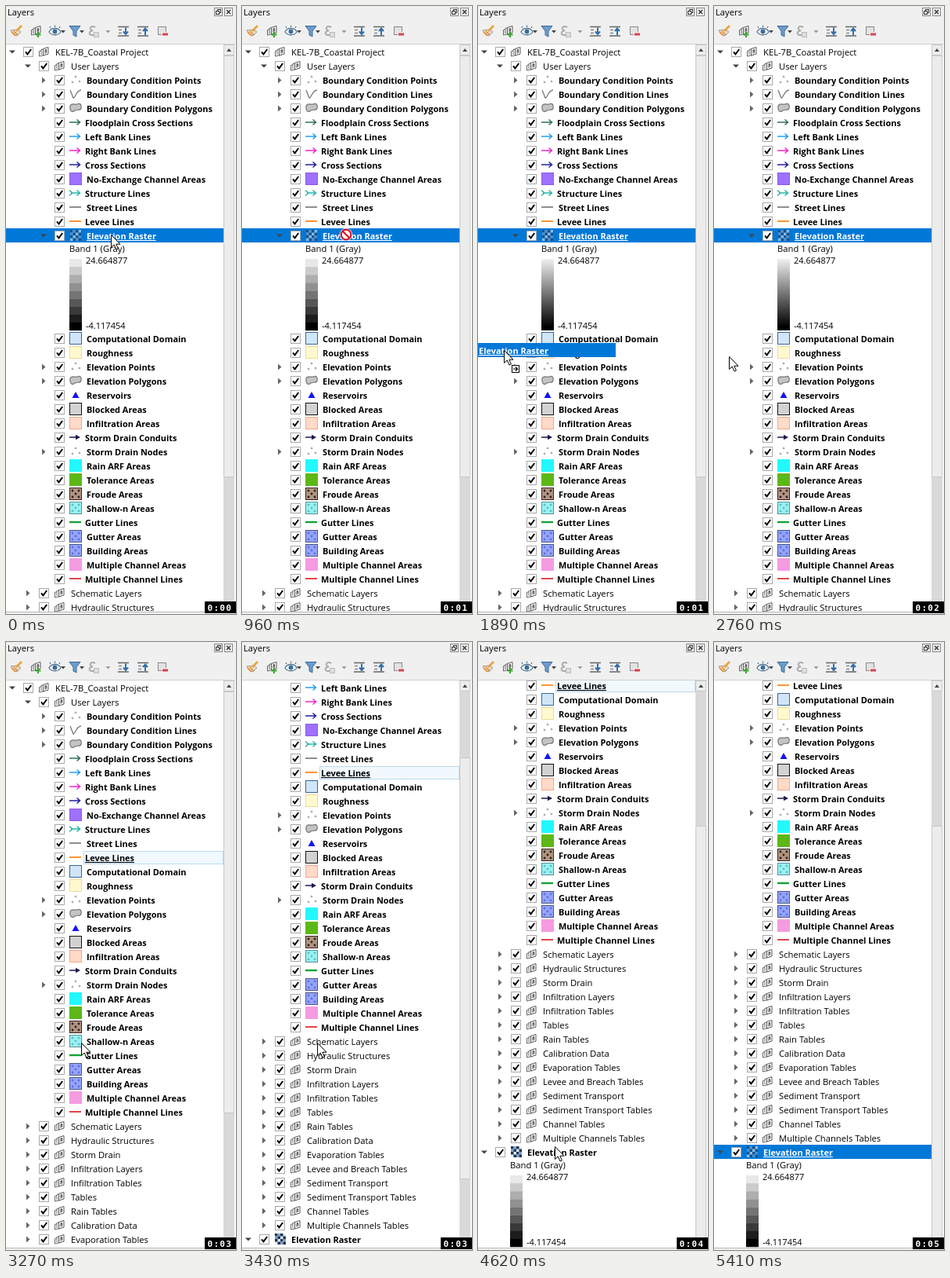
An HTML page that plays this animation: 294 px wide and 774 px high, repeating every 5950 ms.

```html
<!DOCTYPE html>
<html lang="en">
<head>
<meta charset="utf-8">
<title>Layers panel</title>
<style>
html, body { margin: 0; width: 100%; height: 100%; overflow: hidden; background: #f0f0f0; }
svg { display: block; width: 100%; height: 100%; }
text { font: 450 11.25px "Open Sans", "Noto Sans", sans-serif; fill: #000; white-space: pre; }
.b { font-weight: 700; font-size: 10.95px; }
.u { text-decoration: underline; }
.w { fill: #fff; }
.num { font-size: 11px; }
.clock { font: 700 11px "DejaVu Sans Mono", monospace; letter-spacing: 1.3px; fill: #fff; }
</style>
</head>
<body>
<svg id="stage" viewBox="0 0 294 774" xmlns="http://www.w3.org/2000/svg"></svg>
<script>
const LOOP = 5950, ROW = 18, TOP = 49, BLUE = '#0078d7';

// ---- drawing helpers ----
const rect = (x, y, w, h, fill, more = '') =>
  `<rect x="${x}" y="${y}" width="${w}" height="${h}" fill="${fill}" ${more}/>`;
const box = (x, y, w, h, fill, edge) =>
  rect(x + .5, y + .5, w - 1, h - 1, fill, `stroke="${edge}"`);
const path = (d, stroke, width = 1, fill = 'none') =>
  `<path d="${d}" stroke="${stroke}" stroke-width="${width}" fill="${fill}"/>`;
const dot = (x, y, r, fill, more = '') =>
  `<circle cx="${x}" cy="${y}" r="${r}" fill="${fill}" ${more}/>`;
const text = (x, y, s, cls = '', id = '') =>
  `<text x="${x}" y="${y}" class="${cls}" ${id && `id="${id}"`}>${s}</text>`;
const group = (x, y, body, id = '') =>
  `<g transform="translate(${x} ${y})" ${id && `id="${id}"`}>${body}</g>`;

// ---- layer symbols, 16 x 16 ----
const fill = (c, edge = c) => ({ tx: 103, art: box(0, 0, 16, 16, c, edge) });
const line = (c, w = 2, tx = 101) => ({ tx, art: path('M0 8H15', c, w) });
const arrow = c => ({ tx: 101, art: path('M0 8H13.5M9.5 4.5L13.5 8L9.5 11.5', c, 1.5) });
const dotted = (c, spot, edge) => {
  let art = box(0, 0, 16, 16, c, edge);
  for (const [x, y] of [[4, 4], [12, 4], [8, 8], [4, 12], [12, 12]]) art += dot(x, y, 1.4, spot);
  return { tx: 103, art };
};
const points = { tx: 103, art: [[4, 11], [8, 4], [13, 10]]
  .map(([x, y]) => dot(x, y, 1.1, '#bbb', 'stroke="#888" stroke-width=".5"')).join('') };
const vee = { tx: 103, art: path('M1 3L5 13C8 13 8 4 15 3', '#777', 1.3) };
const blob = { tx: 103, art: path('M1 5C3 1 7 4 10 3C14 1 16 4 15 8C14 12 10 9 7 11C4 14 0 12 1 5Z', '#777', 1.2, '#c4c4c4') };
const fork = { tx: 101, art: path('M2 8H13.5M9.5 4.5L13.5 8L9.5 11.5M0 4.5L4 8L0 11.5', '#2bb5a8', 1.5) };
const tri = { tx: 103, art: path('M8 4L12.5 12H3.5Z', 'none', 0, '#1414f5') };
const conduit = { tx: 101, art: path('M0 8H12', '#1b1b4b', 1.5) + path('M8 4.8L14 8L8 11.2Z', 'none', 0, '#1b1b4b') };
const folder = path('M1.5 6.5V13L8 11.5M4 4.5V11', '#666') +
  path('M6.5 3.5L13 1.5V10L6.5 12Z', '#555', 1, '#fff') + path('M1.5 6.5L4 5.7M4 4.5L6.5 3.7', '#666') +
  path('M9 9.5V5.5Q9.8 3.8 10.6 5V8.5', '#444', 1.1);

let checker = rect(1, 1, 14, 14, '#e6eef6');
for (let j = 0; j < 4; j++) for (let i = 0; i < 4; i++)
  if ((i + j) % 2 === 0) checker += rect(1 + i * 3.5, 1 + j * 3.5, 3.5, 3.5, '#1f3557');
  else if (i + j !== 3) checker += rect(1 + i * 3.5, 1 + j * 3.5, 3.5, 3.5, '#7da0c8');

const check = x => box(x - 6, 3, 13, 13, '#fff', '#a8a8a8') +
  path(`M${x - 3} 9.3L${x - .5} 12.3L${x + 4.2} 6`, '#000', 2);
const twist = (x, open) => open
  ? path(`M${x - 4} 7.5H${x + 4}L${x} 11.5Z`, 'none', 0, '#444')
  : path(`M${x - 2} 5.5V13.5L${x + 2.5} 9.5Z`, 'none', 0, '#666');

const folderRow = (name, depth, open) => {
  const x = depth * 20;
  return twist(x + 8, open) + check(x + 28) + group(x + 41, 2, folder) + text(x + 63, 14, name);
};
const layerRow = ([name, sym, closed]) =>
  (closed ? twist(48) : '') + check(68) + group(81, 1, sym.art) +
  text(sym.tx, 14, name, 'b', name === 'Levee Lines' ? 'levee' : '');
const stack = (rows, from = 0) => rows.map((r, i) => group(0, (from + i) * ROW, r)).join('');

const head = [
  ['Boundary Condition Points', points, 1],
  ['Boundary Condition Lines', vee, 1],
  ['Boundary Condition Polygons', blob, 1],
  ['Floodplain Cross Sections', arrow('#2f7358')],
  ['Left Bank Lines', arrow('#26a0ee')],
  ['Right Bank Lines', arrow('#f028d2')],
  ['Cross Sections', arrow('#2222a0')],
  ['No-Exchange Channel Areas', fill('#a070ff', '#8a5ce6')],
  ['Structure Lines', fork],
  ['Street Lines', line('#8f8f8f', 2, 103)],
  ['Levee Lines', line('#ff9430')]
];
const tail = [
  ['Computational Domain', fill('#d0e5f8', '#3f6593')],
  ['Roughness', fill('#fff9cf', '#ecdc95')],
  ['Elevation Points', points, 1],
  ['Elevation Polygons', blob, 1],
  ['Reservoirs', tri],
  ['Blocked Areas', fill('#d2d2d2', '#111')],
  ['Infiltration Areas', fill('#ffdac8', '#f2a88a')],
  ['Storm Drain Conduits', conduit],
  ['Storm Drain Nodes', points, 1],
  ['Rain ARF Areas', fill('#22f8ff')],
  ['Tolerance Areas', fill('#5cb816')],
  ['Froude Areas', dotted('#b09480', '#2c201a', '#33261f')],
  ['Shallow-n Areas', dotted('#98f2f2', '#62bcc4', '#5c8f94')],
  ['Gutter Lines', line('#14a238', 2.4)],
  ['Gutter Areas', dotted('#94a4ff', '#5f6fd0', '#4d5580')],
  ['Building Areas', dotted('#94a4ff', '#5f6fd0', '#4d5580')],
  ['Multiple Channel Areas', fill('#f59be0')],
  ['Multiple Channel Lines', line('#e64545')]
];
const groups = ['Schematic Layers', 'Hydraulic Structures', 'Storm Drain', 'Infiltration Layers',
  'Infiltration Tables', 'Tables', 'Rain Tables', 'Calibration Data', 'Evaporation Tables',
  'Levee and Breach Tables', 'Sediment Transport', 'Sediment Transport Tables',
  'Channel Tables', 'Multiple Channels Tables'];

const rasterFace = check(68) + group(81, 1, checker);
const tint = rect(82, 2, 14, 14, BLUE, 'opacity=".42"');
let bands = '';
for (let i = 0; i < 9; i++) {
  const v = Math.round(232 * (1 - i / 8));
  bands += rect(81, 39 + i * 91 / 9, 16, 91 / 9 + .2, `rgb(${v},${v},${v})`);
}
const raster = twist(48, true) + rasterFace + `<g id="tint">${tint}</g>` +
  text(103, 14, 'Elevation Raster', 'b', 'rasterName') +
  text(81, 30, 'Band 1 (Gray)') +
  rect(81, 39, 16, 91, 'url(#ramp)', 'id="smooth"') + `<g id="bands">${bands}</g>` +
  text(102, 45, '24.664877', 'num') + text(102, 128, '-4.117454', 'num');

const tree =
  rect(0, 0, 278, ROW, BLUE, 'id="sel"') +
  `<g id="focus">${box(99, 217, 179, 17, '#f1f8fe', '#bcd9f0')}</g>` +
  stack([folderRow('KEL-7B_Coastal Project', 0, true), folderRow('User Layers', 1, true), ...head.map(layerRow)]) +
  group(0, 0, stack([...tail.map(layerRow), ...groups.map(n => folderRow(n, 1, false))], 13), 'tail') +
  group(0, 0, raster, 'raster');

// ---- toolbar ----
const drop = x => path(`M${x - 3} 31H${x + 3}L${x} 34.5Z`, 'none', 0, '#444');
const listIcon = (x, up) =>
  path(`M${x} 26.5H${x + 14}M${x} 38H${x + 14}`, '#666', 1.4) +
  path(`M${x + 1} 30.5H${x + 5}M${x + 1} 34.5H${x + 5}`, '#888', 1.6) +
  path(up ? `M${x + 10} 37V29M${x + 7} 32L${x + 10} 28.5L${x + 13} 32` : `M${x + 10} 27.5V35M${x + 7} 32.5L${x + 10} 36L${x + 13} 32.5`, '#2f6fae', 2);
const toolbar =
  path('M6 31L10 36L14 38L19 33L15 30Z', '#999', 1, '#e8dcc8') +
  path('M7 33L12 38M10 32L15 37', '#e58a2c', 1.6) + path('M13 32L20 25', '#e8a33c', 2.6) +
  group(31, 24, folder) + path('M41 33V40M37.5 36.5H44.5', '#3fa535', 2.2) +
  path('M55 33C58 27 67 27 70 33C67 38 58 38 55 33Z', '#57768f', 1.3, '#fff') + dot(62.5, 32.5, 3, '#3c6e9c') +
  path('M57 28L56 26M62.5 27V24.5M68 28L69 26', '#57768f', 1.2) + drop(73) +
  path('M81 25.5H95L90 32V39L86 37V32Z', '#3c6c9e', 1, '#6c9ccb') + drop(97) +
  path('M114 27C108 24 105 30 111 31.5C104 32 106 40 114 36', '#aaa', 2) + box(112, 33, 7, 7, '#ddd', '#bbb') +
  path('M127.5 31H133.5L130.5 34.5Z', 'none', 0, '#999') +
  listIcon(143, false) + listIcon(168, true) +
  box(194, 26, 11, 11, '#e2e2e2', '#888') + rect(199, 33, 8, 6, '#f0f0f0') + rect(200, 34.5, 7, 3, '#d8434a');

const titleBar = text(2, 12, 'Layers') +
  box(266, 2, 11, 11, '#f0f0f0', '#888') + box(270, 4, 5, 5, 'none', '#333') + box(268, 6, 5, 5, '#f0f0f0', '#333') +
  box(279, 2, 11, 11, '#f0f0f0', '#888') + path('M282 5L287 10M287 5L282 10', '#333', 1.4);

// ---- pointer shapes, hot spot at 0,0 ----
const arrowCursor = path('M.5 .5V16.5L4.2 13L7 19L9.4 18L6.8 12.2H12Z', '#000', 1, '#fff');
const banCursor = dot(7, 7, 8, '#fff') + dot(7, 7, 6.3, '#fff', 'stroke="#d3172b" stroke-width="2.2"') +
  path('M2.7 2.7L11.3 11.3', '#d3172b', 2.2);
const dropMark = box(10, 19, 10, 10, '#fff', '#000') + path('M12 24H17.5M15 21.5L17.5 24L15 26.5', '#000', 1.2);

document.getElementById('stage').innerHTML = `
  <defs>
    <linearGradient id="ramp" x1="0" y1="0" x2="0" y2="1">
      <stop offset="0" stop-color="#f0f0f0"/><stop offset=".95" stop-color="#000"/>
    </linearGradient>
    <clipPath id="view"><rect x="0" y="49" width="279" height="722"/></clipPath>
  </defs>` +
  rect(0, 0, 294, 774, '#f0f0f0') + titleBar + toolbar +
  rect(0, 48, 293, 724, '#fff') + path('M0 48.5H293', '#d0d0d0') + path('M0 771.5H293', '#b8b8b8') +
  `<g clip-path="url(#view)">${group(0, TOP, tree, 'tree')}</g>` +
  rect(278, 49, 14, 722, '#d9d9d9') + box(278, 49, 14, 14, '#ececec', '#c8c8c8') +
  path('M282 58H288L285 54Z', 'none', 0, '#444') +
  group(0, 0, box(278, 0, 14, 537, '#ececec', '#c8c8c8'), 'thumb') +
  group(0, 0, rect(57, 0, 221, ROW, BLUE) + rasterFace + tint + text(103, 14, 'Elevation Raster', 'b u w'), 'strip') +
  group(0, 0, `<g id="tip">${arrowCursor}</g><g id="ban">${banCursor}</g><g id="mark">${dropMark}</g>`, 'pointer') +
  rect(254, 758, 40, 15, '#000') + text(257.5, 770, '0:00', 'clock', 'clock');

// ---- timeline ----
const PLAIN = 0, BAN = 1, DRAG_BAN = 2, DRAG_DROP = 3, HIDDEN = 4;
const moves = [
  [0, 134, 291, PLAIN], [840, 126, 284, BAN],
  [1110, 99, 346, DRAG_BAN], [1230, 88, 364, DRAG_BAN], [1350, 78, 380, DRAG_BAN], [1470, 61, 401, DRAG_BAN],
  [1620, 50, 414, DRAG_BAN], [1740, 40, 427, DRAG_DROP],
  [1890, 33, 438, DRAG_DROP], [2010, 27, 443, DRAG_DROP], [2130, 22, 446, DRAG_DROP], [2240, 19, 446, DRAG_DROP],
  [2360, 19, 446, PLAIN], [3030, 45, 469, PLAIN], [3150, 80, 498, PLAIN], [3270, 96, 510, PLAIN],
  [3970, 98, 545, PLAIN], [4090, 101, 596, PLAIN], [4200, 104, 650, PLAIN], [4320, 104, 685, PLAIN],
  [4480, 95, 656, PLAIN], [4620, 98, 642, PLAIN], [4770, 99, 646, PLAIN], [5410, 0, 0, HIDDEN]
];
const END = 219, THUMB_TRAVEL = 171;
const scrolls = [[0, 0], [3430, 108], [3570, END]];
const seconds = [[0, 0], [960, 1], [2010, 2], [3030, 3], [3970, 4], [5020, 5]];
const MOVED = 2880, PICKED = 4910, SMOOTH = 1110;

const at = (table, t) => table.filter(r => r[0] <= t).pop().slice(1);
const el = id => document.getElementById(id);
const show = (id, on) => { el(id).style.display = on ? '' : 'none'; };
const place = (id, x, y) => el(id).setAttribute('transform', `translate(${x} ${y})`);

function render(t) {
  const [x, y, kind] = at(moves, t), [scroll] = at(scrolls, t);
  const moved = t >= MOVED, on = !moved || t >= PICKED;
  const rasterY = moved ? 810 : 234;

  place('tree', 0, TOP - scroll);
  place('tail', 0, moved ? 0 : 131);
  place('raster', moved ? -40 : 0, rasterY);
  el('sel').setAttribute('y', rasterY);
  place('thumb', 0, 63 + Math.round(scroll * THUMB_TRAVEL / END));
  show('sel', on);
  show('tint', on);
  show('focus', !on);
  el('rasterName').setAttribute('class', on ? 'b u w' : 'b');
  el('levee').setAttribute('class', on ? 'b' : 'b u');

  const smooth = t >= SMOOTH && !moved;
  show('smooth', smooth);
  show('bands', !smooth);

  place('pointer', x, y);
  show('tip', kind === PLAIN || kind === DRAG_DROP);
  show('ban', kind === BAN || kind === DRAG_BAN);
  show('mark', kind === DRAG_DROP);
  place('strip', x - 135, y - 9);
  show('strip', kind === DRAG_BAN || kind === DRAG_DROP);
  el('clock').textContent = '0:0' + at(seconds, t)[0];
}

const start = performance.now();
function tick() {
  render((performance.now() - start) % LOOP);
  requestAnimationFrame(tick);
}
tick();
</script>
</body>
</html>
```
